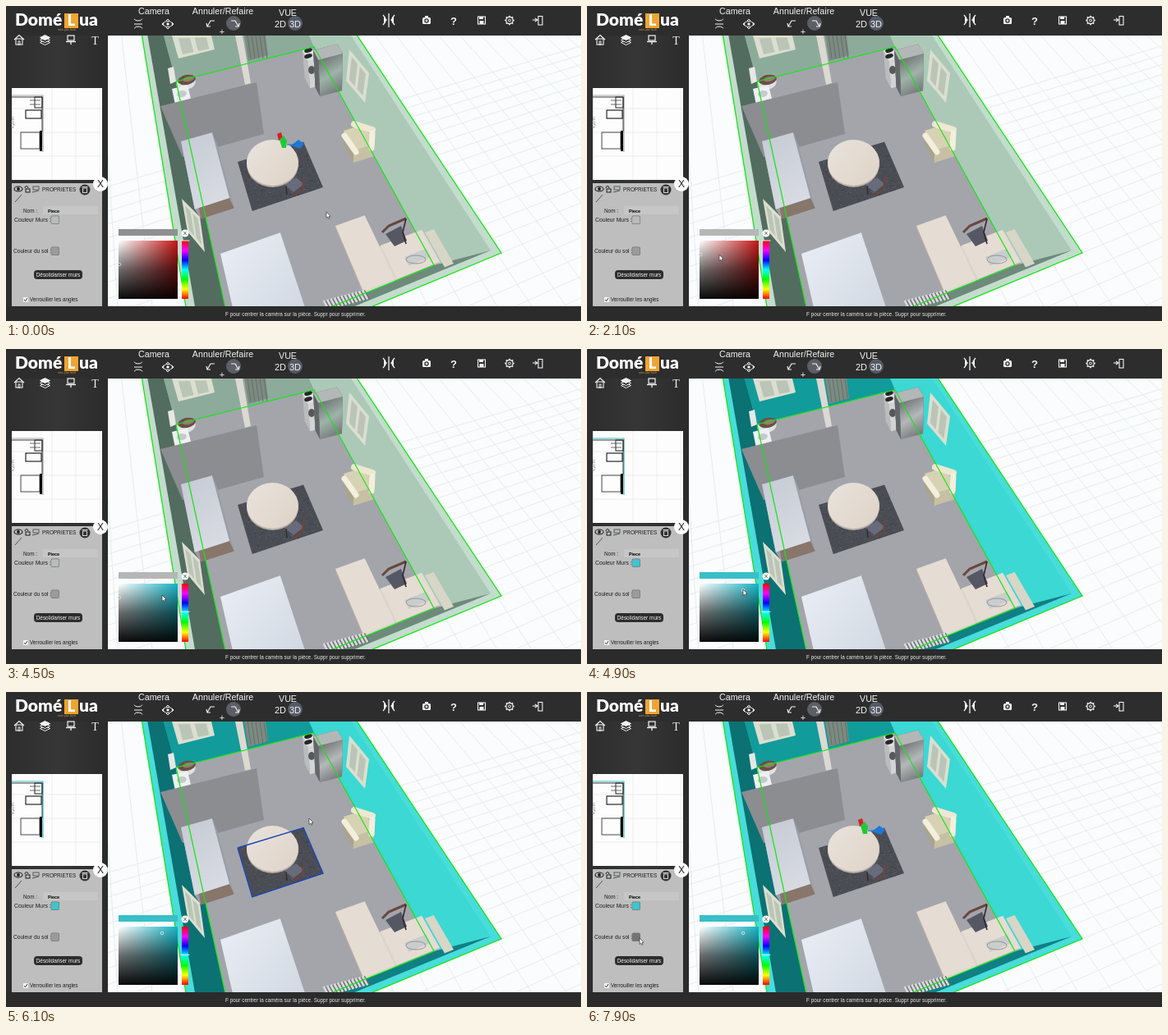
Animation, 700 px wide and 384 px high, one loop 8 s. Source, as an HTML page with a canvas:

```html
<!DOCTYPE html>
<html lang="fr">
<head>
<meta charset="utf-8">
<title>Plan 3D</title>
<style>
html, body { margin: 0; width: 100%; height: 100%; overflow: hidden; background: #2d2d2d; }
canvas { display: block; width: 700px; height: 384px; }
</style>
</head>
<body>
<canvas id="stage" width="700" height="384"></canvas>
<script>
const c = document.getElementById('stage').getContext('2d');
const LOOP = 8000, PAINTED = 4700;
const SANS = '"Liberation Sans", Arial, sans-serif';
const WHITE = '#f3f3f3', INK = '#1d1d1d', GREEN = '#12e612';

// Vanishing points: room length, room width, verticals
const FAR = [81, -487], SIDE = [2500, -487], DOWN = [400, 510];

const PALE = { top: '#c3dccd', right: '#acc9b8', back: '#8dab9b', left: '#536c60', front: '#6d8a7b', swatch: '#b9bcbc', steel: '#9fb3a9' };
const TEAL = { top: '#48dcda', right: '#3bd8d4', back: '#129b9b', left: '#0b7173', front: '#108084', swatch: '#3ec6cf', steel: '#b4b8b9' };

const HAND = [
  [0, 390, 254], [1700, 161, 306], [2300, 161, 306], [2900, 218, 292], [3800, 219, 320],
  [4500, 190, 303], [4900, 190, 296], [6100, 369, 157], [7900, 64, 303]
];
const HUE = [[0, 360], [2900, 360], [3800, 205], [4150, 186]];

function track(keys, t) {
  let i = 1;
  while (i < keys.length - 1 && keys[i][0] < t) i++;
  const a = keys[i - 1], b = keys[i];
  const k = Math.min(1, Math.max(0, (t - a[0]) / (b[0] - a[0])));
  const e = k * k * (3 - 2 * k);
  return a.slice(1).map((v, n) => v + (b[n + 1] - v) * e);
}

// Drawing helpers
function path(p, close) {
  c.beginPath();
  for (let i = 0; i < p.length; i += 2) c.lineTo(p[i], p[i + 1]);
  if (close) c.closePath();
}
function poly(fill, ...p) { path(p, true); c.fillStyle = fill; c.fill(); }
function quad(fill, ...points) { poly(fill, ...points.flat()); }
function line(color, w, ...p) { path(p); c.strokeStyle = color; c.lineWidth = w; c.stroke(); }
function edge(color, w, points) { line(color, w, ...points.flat(), ...points[0]); }
function rect(fill, x, y, w, h) { c.fillStyle = fill; c.fillRect(x, y, w, h); }
function box(color, w, x, y, bw, bh) { c.strokeStyle = color; c.lineWidth = w; c.strokeRect(x, y, bw, bh); }
function oval(fill, x, y, rx, ry = rx, turn = 0) {
  c.beginPath(); c.ellipse(x, y, rx, ry, turn, 0, 7); c.fillStyle = fill; c.fill();
}
function ring(color, w, x, y, rx, ry = rx, a = 0, b = Math.PI * 2) {
  c.beginPath(); c.ellipse(x, y, rx, ry, 0, a, b); c.strokeStyle = color; c.lineWidth = w; c.stroke();
}
function pill(fill, x, y, w, h, r) { c.beginPath(); c.roundRect(x, y, w, h, r); c.fillStyle = fill; c.fill(); }
function text(s, x, y, size, color, align = 'left', font = SANS, weight = '') {
  c.font = `${weight} ${size}px ${font}`;
  c.textAlign = align; c.fillStyle = color; c.fillText(s, x, y);
}
function grad(x0, y0, x1, y1, ...stops) {
  const g = c.createLinearGradient(x0, y0, x1, y1);
  stops.forEach((s, i) => g.addColorStop(i / (stops.length - 1), s));
  return g;
}

// Perspective helpers
function meet(a, b, p, q) {
  const ux = b[0] - a[0], uy = b[1] - a[1], vx = q[0] - p[0], vy = q[1] - p[1];
  const k = ((p[0] - a[0]) * vy - (p[1] - a[1]) * vx) / (ux * vy - uy * vx);
  return [a[0] + k * ux, a[1] + k * uy];
}
// Level rectangle from its far-left and near-right corners
function slab(x0, y0, x1, y1) {
  const a = [x0, y0], b = [x1, y1];
  return [a, meet(a, SIDE, b, FAR), b, meet(a, FAR, b, SIDE)];
}
function block(s, drop, top, flank, front) {
  const base = s.map(p => p.map((v, i) => v + (DOWN[i] - v) * drop));
  for (const i of [0, 1, 2]) quad(i === 2 ? front : flank, s[i], s[i + 1], base[i + 1], base[i]);
  quad(flank, s[3], s[0], base[0], base[3]);
  quad(top, ...s);
}

const FLOOR = slab(207, 92, 521, 316);
const INNER = slab(136, -172, 590, 298);
const OUTER = slab(129, -190, 603, 301);
const RUG = slab(282, 190, 386, 221);

function ground() {
  rect('#fafcfd', 124, 36, 576, 330);
  for (let i = -14; i < 30; i++) {
    line('#dde6ea', 0.7, ...FAR, 220 + i * 42, 366);
    line('#dde6ea', 0.7, ...SIDE, 446 + i * 58, 366);
  }
}

function walls(w) {
  quad(w.top, ...OUTER);
  ['back', 'right', 'front', 'left'].forEach((name, i) => {
    const j = (i + 1) % 4;
    quad(w[name], INNER[i], INNER[j], FLOOR[j], FLOOR[i]);
  });
  quad('#a3a5ab', ...FLOOR);
}

function pane(...p) {
  quad('#dcdfcf', ...p);
  const at = (u, v) => [0, 1].map(i =>
    (p[0][i] * (1 - u) + p[1][i] * u) * (1 - v) + (p[3][i] * (1 - u) + p[2][i] * u) * v);
  for (const u of [0.14, 0.56]) {
    quad('#bac5b8', at(u, 0.13), at(u + 0.3, 0.13), at(u + 0.3, 0.87), at(u, 0.87));
  }
}

function bathroom() {
  pane([202, 36], [250, 36], [254, 53], [210, 64]);
  poly('#7c8a82', 290, 36, 316, 36, 319, 60, 295, 67);
  for (let x = 294; x < 316; x += 5) line('#62706a', 1, x, 36, x + 4, 64);
  poly('#dcd9d2', 279, 36, 288, 36, 298, 94, 291, 96);
  poly('#e5e8e7', 197, 76, 204, 74, 207, 92, 200, 95);
  oval('#dfe2e2', 219, 94, 12, 8, -0.25);
  oval('#6b4f45', 220, 90, 11, 6, -0.2);
  oval('#947b70', 222, 89, 7, 3, -0.2);
  quad('#eef0f1', ...slab(202, 101, 225, 113));
  oval('#c4cacd', 214, 107, 6, 4, -0.2);
  poly('#8b8d91', 188, 122, 305, 93, 314, 156, 215, 184);
}

function kitchen(w) {
  block(slab(361, 54, 379, 64), 0.075, '#dfe1e1', '#babcbd', '#d2d4d4');
  for (const y of [54, 61]) oval('#25272a', 368, y, 5, 2.6, -0.3);
  oval('#56595c', 372, 78, 4, 5);
  block(slab(374, 54, 410, 58), 0.1, '#b4b7b8', '#64676a', grad(382, 62, 408, 106, '#6b6f70', w.steel, '#707375'));
  pane([418, 53], [442, 82], [437, 118], [414, 91]);
}

function armchair() {
  block(slab(411, 152, 449, 168), 0.045, '#d8d2b5', '#aaa48d', '#c7c0a5');
  c.lineCap = 'round';
  line('#eee8d0', 8, 424, 144, 446, 151);
  line('#f4efdc', 7, 446, 155, 445, 173);
  line('#f4efdc', 7, 412, 158, 426, 178);
  c.lineCap = 'butt';
}

function rug() {
  quad('#4b4d54', ...RUG);
  c.save();
  path(RUG.flat(), true); c.clip();
  let seed = 7;
  const rnd = () => (seed = seed * 16807 % 2147483647) / 2147483647;
  for (let i = 0; i < 620; i++) {
    rect(i % 2 ? 'rgba(125,130,142,.5)' : 'rgba(35,37,44,.4)', 282 + rnd() * 104, 167 + rnd() * 85, 1, 1);
  }
  c.restore();
}

function chair(x, y, s) {
  poly('#686b7b', x - 11 * s, y, x + 3 * s, y - 9 * s, x + 13 * s, y - 1, x, y + 9 * s);
  line('#2f2729', 1.3, x - 9 * s, y + 1, x - 8 * s, y + 12 * s);
  line('#69473f', 2.6, x + 13 * s, y - 10 * s, x + 11 * s, y + 5 * s, x, y + 13 * s);
}

function tableSet() {
  chair(350, 218, 1);
  oval('#b7aea7', 324.5, 193, 31.5, 28);
  oval(grad(295, 170, 355, 215, '#e8e2db', '#dfd3c7'), 324.5, 191, 31.5, 28);
}

function furniture() {
  block(slab(213, 165, 272, 234), 0.045, grad(215, 160, 270, 245, '#c6cbd5', '#dadde4'), '#9a9ea6', '#88766b');
  pane([214, 235], [236, 257], [242, 300], [221, 275]);
  block(slab(261, 302, 388, 440), 0.04, grad(265, 290, 360, 366, '#e8edf5', '#d3d9e2'), '#a7acb5', '#a7acb5');

  const wood = '#e5dcd3';
  quad('#d8d6c6', ...slab(510, 276, 545, 314));
  block(slab(401, 268, 474, 333), 0.015, wood, '#b5aaa1', wood);
  block(slab(456, 292, 528, 312), 0.01, wood, wood, '#b5aaa1');
  poly('#555764', 462, 278, 481, 268, 488, 286, 473, 293);
  line('#69473f', 3, 458, 276, 466, 268, 487, 259);
  line('#33292b', 1.6, 487, 259, 483, 276, 487, 290);
  quad('#c9cdcd', ...slab(485, 306, 517, 306));
  ring('#8c8e8d', 0.9, 499, 309, 12, 5);

  for (let i = 0; i < 12; i++) {
    const x = 387 + i * 4.3, y = 359 - i * 1.15;
    line('#d9dcdc', 3, x, y, x + 6, y + 11);
    line('#6b7071', 1.3, x + 2, y, x + 8, y + 11);
  }
}

function gizmo() {
  poly('#d91d24', 330, 156, 335, 154, 337, 161, 332, 164);
  poly('#1fc936', 333, 163, 338, 158, 342, 164, 341, 173, 336, 173);
  line('#2b7ed8', 1.4, 342, 169, 351, 169);
  poly('#1f78d5', 347, 170, 356, 163, 363, 168, 358, 174);
}

function picker(t, hue, painted) {
  const x = 137, y = 286, w = 72, h = 71;
  rect(painted ? '#39bfc8' : t < 900 ? '#8f9191' : '#b5b7b7', x, 272, w, 8);
  rect(grad(x, 0, x + w, 0, '#fff', `hsl(${hue},80%,43%)`), x, y, w, h);
  rect(grad(0, y, 0, y + h, 'rgba(0,0,0,0)', 'rgba(0,0,0,.58)', 'rgba(0,0,0,.96)'), x, y, w, h);
  rect(grad(0, y, 0, y + h, '#f00', '#f0f', '#00f', '#0ff', '#0f0', '#ff0', '#f00'), 214, y, 8, h);
  const hy = y + (360 - hue) / 360 * h;
  line('#eee', 1, 212.5, hy, 223.5, hy);
  if (painted) ring('#eee', 0.8, 190, 294, 1.8);
  else ring('#ddd', 0.8, 138, t < 900 ? 315 : 303, 1.8);
  oval('#fff', 218, 277, 4.5);
  text('X', 218, 279.4, 6, '#222', 'center');
}

function topBar() {
  const w = WHITE;
  rect('#2d2d2d', 0, 0, 700, 36);
  text('Camera', 180, 10.2, 10.7, w, 'center');
  text('Annuler/Refaire', 264, 10.2, 10.7, w, 'center');
  text('VUE', 343, 12, 10.7, w, 'center');
  oval('#555b66', 352, 21, 9);
  text('2D', 334, 25.5, 11, w, 'center');
  text('3D', 352, 25.5, 11, w, 'center');

  ring(w, 1, 161, 15, 5, 3, 0.2, 2.9);
  line(w, 1, 156, 22, 166, 22);
  ring(w, 1, 161, 28, 5, 3, 3.4, 6.1);
  ring(w, 1, 197, 22, 5.5, 3.5);
  oval(w, 197, 22, 1.7);
  oval('#5d5f66', 277, 21, 9);
  for (const s of [-1, 1]) {
    line(w, 1, 195, 22 + s * 4, 197, 22 + s * 6, 199, 22 + s * 4);
    line(w, 1, 197 + s * 5, 20, 197 + s * 7, 22, 197 + s * 5, 24);
    const x = 264 + s * 14;
    line(w, 1.2, x - s * 4, 18, x + s, 18, x + s * 5, 25);
    line(w, 1.2, x + s, 25, x + s * 5, 25, x + s * 6, 21);
    poly(w, 466 + s * 2, 17, 466 + s * 6, 13, 466 + s * 6, 21);
    line(w, 1.3, 466 + s * 7, 11, 466 + s * 4, 15);
    line(w, 1.3, 466 + s * 7, 23, 466 + s * 4, 19);
  }
  text('+', 263, 34.5, 11, w, 'center');
  line(w, 1.3, 466, 9, 466, 26);

  pill(w, 507, 14, 10, 8, 1.5); rect(w, 510, 12, 4, 3);
  oval('#2b2b2b', 512, 18, 2.7); oval(w, 512, 18, 1.4);
  text('?', 545, 22.5, 13, w, 'center', SANS, 'bold');
  box(w, 1.1, 574.5, 13, 9, 9); rect(w, 576, 13, 5, 3); rect(w, 576.5, 18, 5, 4);
  for (let a = 0; a < 6; a += Math.PI / 4) {
    const u = Math.cos(a), v = Math.sin(a);
    line(w, 1.6, 613 + u * 4, 17.5 + v * 4, 613 + u * 5.8, 17.5 + v * 5.8);
  }
  ring(w, 1.2, 613, 17.5, 4.2); ring(w, 1, 613, 17.5, 1.5);
  box(w, 1.1, 648, 12.5, 5, 10.5);
  line(w, 1.1, 641, 17, 647, 17); line(w, 1.1, 644, 15, 647, 17, 644, 19);
}

function brand() {
  const font = 'Lato, "Open Sans", sans-serif';
  text('Domé', 11, 24, 21, '#fff', 'left', font, '900');
  rect('#f0a431', 71, 9, 17, 18);
  text('L', 79.5, 24, 18, '#fff', 'center', font, '900');
  text('ua', 89, 24, 21, '#fff', 'left', font, '900');
  text('votre plan facile', 63, 30, 3.2, '#c99a4c');
}

function sideIcons() {
  const w = WHITE;
  line(w, 1.2, 10, 41, 16, 35.5, 22, 41);
  box(w, 1.1, 12, 40, 8, 7); box(w, 0.9, 15, 43, 2, 4);
  for (let y = 44.5; y > 38; y -= 3) {
    poly(y < 39 ? w : '#303030', 41.5, y, 47.5, y - 3, 53.5, y, 47.5, y + 3);
    c.strokeStyle = w; c.lineWidth = 1; c.stroke();
  }
  box(w, 1.2, 75, 36, 8, 6);
  line(w, 1.3, 73, 43.5, 85, 43.5); line(w, 1.3, 79, 43, 79, 47);
  text('T', 108.5, 46.5, 14, w, 'center', '"Liberation Serif", Times, serif');
}

function miniPlan(painted) {
  rect('#fdfdfd', 7, 100, 110, 112);
  for (let i = 0; i < 3; i++) {
    line('#e6e6e6', 0.7, 56 + i * 29, 100, 56 + i * 29, 212);
    line('#e6e6e6', 0.7, 7, 125 + i * 29, 117, 125 + i * 29);
  }
  line(painted ? '#35bfc4' : '#a5aaa7', 1.2, 7, 109, 45, 109, 45, 178);
  line('#222', 0.9, 7, 111, 44, 111, 44, 153);
  box('#222', 1, 35, 111, 9, 13);
  for (const y of [115, 120]) line('#444', 0.8, 29, y, 42, y);
  box('#111', 1.1, 24, 127, 19, 10);
  box('#333', 0.9, 18, 154, 23, 20);
  rect('#080808', 41, 152, 3, 25);
  c.save(); c.translate(9.5, 149); c.rotate(-Math.PI / 2);
  text('4,20 m', 0, 0, 4.5, '#777'); c.restore();
}

function chip(color, y) {
  pill('#777', 54.5, y, 10.5, 10.5, 2);
  pill(color, 55.2, y + 0.7, 9.1, 9.1, 1.5);
}

function properties(t, w) {
  rect('#bebebe', 7, 216, 110, 150);
  rect('#c6c6c6', 45, 244, 67, 10);
  const k = INK;
  ring(k, 1.1, 15, 223, 5, 3); oval(k, 15, 223, 1.9);
  box(k, 1, 24, 223, 5, 4); ring(k, 1, 25, 222, 2, 2.4, 3.1, 6.3);
  box('#4d554f', 0.9, 33, 220, 7, 4); line('#4d554f', 1, 32, 227, 40, 225);
  line('#555', 1, 11, 239, 19, 230);
  text('PROPRIETES', 44, 226, 6.4, k);
  oval('#343434', 96, 224, 6.5);
  box('#e5e5e5', 0.9, 93.5, 222, 5, 5.5); line('#e5e5e5', 0.9, 92.5, 220.5, 99.5, 220.5);
  text('Nom :', 21, 251.5, 6.4, k);
  text('Piece', 51, 251.5, 5.4, '#000', 'left', SANS, 'bold');
  text('Couleur Murs :', 10, 263, 6.8, k);
  text('Couleur du sol :', 9, 301, 6.6, k);
  chip(w.swatch, 255.5);
  chip(t > 7600 ? '#747474' : '#9b9b9b', 293.5);
  pill('#2d2d2d', 34, 322, 59, 11, 4);
  text('Désolidariser murs', 63.5, 329.8, 6.45, '#f5f5f5', 'center');
  pill('#f8f8f8', 21, 355, 6, 6, 1);
  line('#333', 1, 22, 358, 23.5, 359.8, 26, 356);
  text('Verrouiller les angles', 29, 360, 6.3, k);
  oval('#fff', 115, 217, 9);
  text('X', 115, 221.2, 12, '#222', 'center');
}

function pointer(x, y) {
  c.save(); c.translate(x, y - 3);
  poly('#fff', 0, 0, 0, 7.5, 1.7, 6, 2.8, 8.4, 4, 7.8, 3, 5.5, 5, 5.2);
  c.strokeStyle = '#333'; c.lineWidth = 0.7; c.stroke();
  c.restore();
}

function room(t, w) {
  c.save();
  c.beginPath(); c.rect(124, 36, 576, 330); c.clip();
  ground(); walls(w); bathroom(); kitchen(w); armchair();
  rug(); tableSet(); furniture();
  edge(GREEN, 1.3, OUTER);
  edge(GREEN, 1.2, FLOOR);
  if (t >= 5600 && t < 6300) edge('#1b46b4', 1.4, RUG);
  if (t < 900 || t >= 6500) gizmo();
  c.restore();
}

function draw(t) {
  const painted = t >= PAINTED, w = painted ? TEAL : PALE;
  room(t, w);
  topBar();
  rect(grad(0, 0, 124, 0, '#2d2d2d', '#363636', '#2b2b2b'), 0, 36, 124, 330);
  rect('#2b2b2b', 0, 366, 700, 18);
  brand(); sideIcons(); miniPlan(painted); properties(t, w);
  text('F pour centrer la caméra sur la pièce. Suppr pour supprimer.', 267, 378, 6.38, '#e8e8e8');
  picker(t, track(HUE, t)[0], painted);
  pointer(...track(HAND, t));
}

const start = performance.now();
function tick() {
  draw((performance.now() - start) % LOOP);
  requestAnimationFrame(tick);
}
tick();
</script>
</body>
</html>
```
